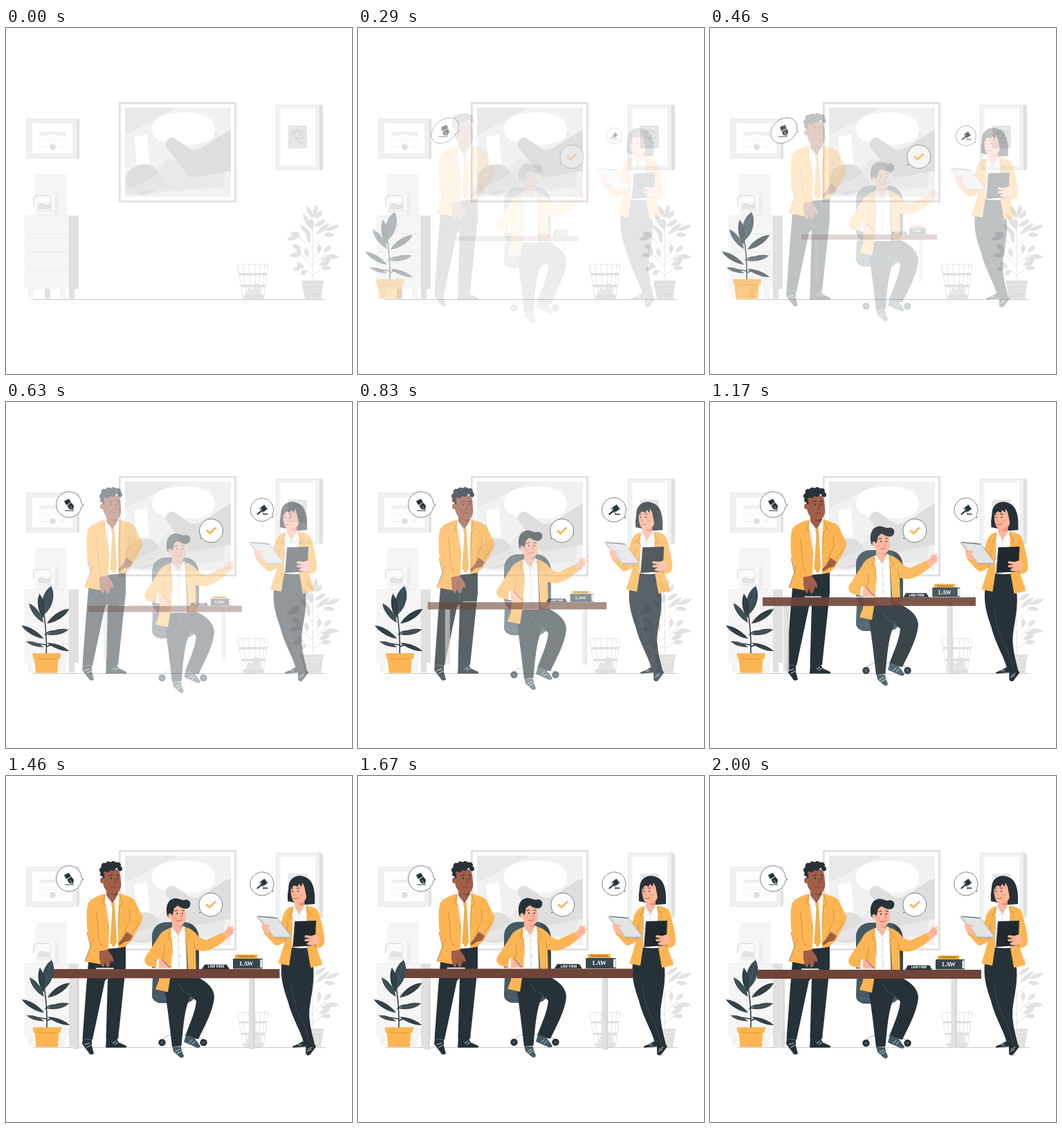
Animation, 500 px wide and 500 px high, one loop 2040 ms. Source, as an HTML page with a canvas:

```html
<!DOCTYPE html>
<html lang="en">
<head>
<meta charset="utf-8">
<title>Law office</title>
<style>
html,body{margin:0;width:100%;height:100%;overflow:hidden;background:#fff}
canvas{display:block;width:100vmin;height:100vmin}
</style>
</head>
<body>
<canvas id="stage"></canvas>
<script>
const SIZE = 500, LOOP = 2040, FPS = 24;
const dpr = Math.max(1, window.devicePixelRatio || 1);
const stage = document.getElementById('stage');
const layer = document.createElement('canvas');
for (const c of [stage, layer]) c.width = c.height = SIZE * dpr;
const out = stage.getContext('2d');
let g = out;

const WHITE = '#fff', INK = '#263238', SLATE = '#455a64', GOLD = '#fcb552', BROWN = '#6f4439';
const DARK_SKIN = '#a15f49', SKIN = '#ffb69b', SEAM = '#a8742e';
const G1 = '#f5f5f5', G2 = '#ebebeb', G3 = '#e0e0e0';

// drawing helpers
function fill(color, d) { g.fillStyle = color; g.fill(new Path2D(d)); }
function line(color, w, d) {
  g.strokeStyle = color; g.lineWidth = w; g.lineCap = g.lineJoin = 'round';
  g.stroke(new Path2D(d));
}
function box(color, x, y, w, h, r = 0) {
  g.fillStyle = color; g.beginPath(); g.roundRect(x, y, w, h, r); g.fill();
}
function oval(color, x, y, rx, ry = rx, rot = 0) {
  g.fillStyle = color; g.beginPath(); g.ellipse(x, y, rx, ry, rot, 0, 7); g.fill();
}
function text(s, x, y, font, color) {
  g.font = font; g.fillStyle = color; g.textAlign = 'center'; g.textBaseline = 'middle';
  g.fillText(s, x, y);
}
function leaf(color, x, y, tx, ty, w) {
  const dx = tx - x, dy = ty - y, l = Math.hypot(dx, dy), nx = -dy / l * w, ny = dx / l * w;
  g.fillStyle = color; g.beginPath(); g.moveTo(x, y);
  g.bezierCurveTo(x + dx * .3 + nx, y + dy * .3 + ny, x + dx * .75 + nx, y + dy * .75 + ny, tx, ty);
  g.bezierCurveTo(x + dx * .75 - nx, y + dy * .75 - ny, x + dx * .3 - nx, y + dy * .3 - ny, x, y);
  g.fill();
}

function room() {
  // certificate
  box('#f0f0f0', 29.5, 131.5, 74, 57); box(G3, 103, 131.5, 3, 57);
  line(G3, .6, 'M29.5 131.5H103V188.5H29.5Z');
  box(WHITE, 38, 138, 58, 43);
  text('CERTIFICATE', 67.5, 153.5, '700 6.3px "Open Sans", sans-serif', '#dcdcdc');
  line(G2, .6, 'M48 160.5H87M48 163.5H87M49 173H59M76 173H87');
  line(G3, .5, 'M50 172q2 -4 3 -1t4 -1M78 172q2 -4 3 -1t4 -1');
  oval(G3, 67.5, 172, 4.5);
  // coffee maker
  box(G1, 42.5, 211, 46, 61, 5); line(G2, .6, 'M75.5 216V271M45 217H86');
  fill('#efefef', 'M70 238H75V271H70Z');
  box('#fafafa', 45, 240, 24, 24, 2);
  line('#dedede', 1.6, 'M40 256V247Q40 242 45 242H63');
  fill('#e3e3e3', 'M46 255Q52 251 56 254T64 252V262H46Z');
  line(G3, 1, 'M44 264H69M65 242V262');
  // cabinet
  box(G1, 26.5, 271, 65, 106); box(G3, 91, 271, 14, 106);
  line('#e8e8e8', .7, 'M29 297.5H88M29 323.5H88M29 350.5H88M26.5 271.5H91');
  for (const y of [286, 311, 337, 362]) oval('#e6e6e6', 57.5, y, 1.4);
  box(G1, 32, 377, 8, 14); box(G3, 56, 377, 8, 14); box(G1, 78, 377, 8, 14); box(G3, 91, 377, 8, 14);
  // large painting
  box('#dfdfdf', 163, 107, 170, 145); box(WHITE, 165.7, 109.7, 164.6, 139.6);
  g.save(); g.beginPath(); g.rect(172, 115, 153, 129); g.clip();
  box('#f1f1f1', 172, 115, 153, 129);
  fill('#e9e9e9', 'M172 115H247Q215 133 172 154Z');
  fill('#e9e9e9', 'M205 220L234 189L318 206L313 230L172 241V225Z');
  fill(WHITE, 'M185 157L204 154L207 197L189 199Z');
  fill(WHITE, 'M211 146C211 126 238 122 262 122C288 122 303 134 302 148C301 163 281 171 256 168C232 166 211 165 211 146Z');
  fill('#dedede', 'M232 172C228 165 235 156 242 159C253 164 265 178 274 176C288 173 306 156 325 147V206L275 216Q265 218 261 211Z');
  oval('#dedede', 198, 219, 25, 22, -.2);
  fill('#e6e6e6', 'M176 232C195 224 205 222 222 210L236 230L180 240Z');
  g.restore();
  // small frame
  box('#f2f2f2', 390, 111, 63, 94); box(G3, 453, 111, 5, 94);
  line(G3, .7, 'M390.5 111.5H453V204.5H390.5Z');
  box(WHITE, 396.5, 117, 50.5, 82); box('#e6e6e6', 408, 141, 27, 33);
  line('#d5d5d5', 1.4, 'M412 153C418 145 428 146 425 154C422 161 414 160 417 152C421 146 434 150 431 157C428 163 419 159 424 155M420 160Q424 168 429 166');
  // waste basket
  line(G3, .8, 'M335 341.5H379L372 391H343ZM342 342L348 390M351 342L354 390M360 342V390M368 342L365 390M374 342L369 390');
  fill('#e6e6e6', 'M346 386L350 375L355 379L360 367L367 372L369 386Z');
  fill(G3, 'M337 354H377L376.5 357.5H337.5ZM340 371H375L374.5 374.5H340.5ZM342 386H373L371 391.5H345Z');
  // pale plant
  line(G3, .9, 'M443 366V279M443 318L420 300M443 316L466 296M443 345L425 326M443 343L463 325M443 356L428 347M443 357L461 346M443 335L455 320');
  for (const [x, y, tx, ty] of [
    [444, 275, 434, 257], [445, 274, 449, 255], [447, 276, 457, 264], [443, 292, 429, 268], [443, 290, 441, 275],
    [446, 287, 462, 277], [440, 300, 425, 284], [448, 298, 468, 282], [426, 300, 406, 306], [425, 297, 411, 298],
    [461, 293, 482, 285], [459, 298, 475, 300], [438, 311, 436, 291], [425, 318, 413, 314], [427, 327, 409, 329],
    [424, 331, 422, 314], [436, 332, 433, 318], [452, 326, 453, 312], [459, 324, 470, 315], [461, 330, 481, 331],
    [455, 334, 470, 335], [427, 345, 415, 350], [430, 347, 420, 338], [434, 350, 426, 357], [455, 347, 470, 347], [452, 343, 468, 338]
  ]) leaf('#e2e2e2', x, y, tx, ty, 4.2);
  fill(G3, 'M427 365H459L455 391.5H432Z');
  line('#ececec', .8, 'M430 371H456M434 376H453M436 381H450');
  line('#a9aeb1', .7, 'M39 392.4H461');
}

function standingMan() {
  fill(INK, 'M120 258L146 266L147 246H173L173 276L162 380L144.5 380L147 292L143 296L125 381L110.5 380L116 305Z');
  line('#53626a', .5, 'M146 268L147 292');
  fill(INK, 'M111 380L124 381L124 390L127 401Q122 405 119 399L110 387Z');
  fill(INK, 'M145 379L159 378L163 385L174 390V392.5H144Z');
  line(WHITE, .8, 'M114 388L121 386M117 392L123 389M154 386L159 383M157 388L162 385');
  fill(WHITE, 'M143 172L164 171L166 248L145 250L141 200Z');
  fill(DARK_SKIN, 'M145 160H162V173L154 184L145 174Z');
  fill('#834837', 'M149 168Q158 171 162 167V173Q154 174 149 168Z');
  fill(DARK_SKIN, 'M140 140C149 132 163 132 165 142L166.5 157C166 167 160 171 153 170C146 169 141 162 140 154Z');
  oval(DARK_SKIN, 139, 151, 3, 4);
  for (const [x, y, r] of [[139, 136, 4], [142, 130, 4.5], [148, 128, 4.5], [155, 127.5, 4.5], [161.5, 129, 4.5], [164.5, 134, 3.5], [154, 132, 5], [146, 134, 5], [139, 142, 3], [141, 146, 1.8]])
    oval(INK, x, y, r);
  line(INK, 1.1, 'M149 144L153 143M159 143L163 144');
  oval(INK, 152, 148, .9, 1.2); oval(INK, 161, 148, .9, 1.2);
  line('#6c3729', .8, 'M157 148L159 154L156 155M152 161Q157 159 160 161');
  fill(WHITE, 'M144 171L153 183L148 187L141 176ZM162 170L155 183L160 186L166 174Z');
  line('#9aa3a8', .4, 'M144 172L153 183L148 187M162 171L155 183L160 186');
  fill('#f5ae49', 'M152 183H157L160 240L156 248L150.5 241L153.5 192Z');
  fill(GOLD, 'M143 170C132 173 122 178 119 183C115 195 117 215 118 228L122 246L114 268L136 272C144 262 148 251 148 246L149 223L144 190Z');
  fill(GOLD, 'M164 169.5C174 173 185 175 187 182L197 203C199 209 192 218 182 237L172 247L162 248C162 230 162 190 164 169.5Z');
  line(SEAM, .55, 'M143 172L140 184L145 188L149 222M164 171L169 184L164 188L162 220M131 197L134 236L138 246M178 194L179 208L170 227M122 246L126 236M180 228Q189 219 193 211');
  line(INK, .45, 'M117 226L122 246L114 268');
  fill(DARK_SKIN, 'M135 253L147 251L154 261L156 269L152 267L149 275L146 277L143 270L141 277L137 273L135 264Z');
  line('#70402f', .5, 'M143 270L145 262M149 272L149 264');
  fill(DARK_SKIN, 'M174 225L183 231L179 238L171 240L164 245L162 242L168 235Z');
  line('#70402f', .5, 'M165 242L174 235');
}

function woman() {
  fill(INK, 'M407 162C407 147 420 141 431 146C443 150 446 166 445 185L432 186L406 181Q405 172 407 162Z');
  fill(INK, 'M402 247H436L443 278C445 305 437 325 437 345C438 365 443 378 445 389L430 390C427 372 412 350 406 325C399 305 395 290 397 270Z');
  line('#53626a', .5, 'M410 300Q416 338 430 360L438 386');
  fill(INK, 'M428 383L432 391L413 392.5V390.5L422 387ZM432 389L445 388L447 391L438 403Q433 405 432 401Z');
  line(WHITE, .7, 'M421 389L426 388M435 395L441 392M434 398L440 395');
  fill(WHITE, 'M411 190L433 189L436 248Q422 250 409 247Z');
  fill(SKIN, 'M417 178H430V190L422 199L415 191Z');
  fill(SKIN, 'M411 155L431 153L433 175C431 184 420 187 414 181C410 174 410 164 411 155Z');
  fill('#e9937a', 'M420 184Q428 184 430 179V186Q424 189 420 184Z');
  fill(INK, 'M409 165C408 149 420 143 431 149L439 160L438 185L431 184L433 175L430 160L427 154L426 160L422 156L420 160L415 158Z');
  line(INK, .9, 'M411 163L414 162M419 162L423 162');
  oval(INK, 413, 166.5, .8, 1.2); oval(INK, 421, 166.5, .8, 1.2);
  line('#e57a62', .8, 'M416 167L414.5 172L417 172.5');
  line('#c94f45', .9, 'M414 176.5Q418 179 422 176');
  oval('#ff9f88', 425, 172, 2.2, 1.6);
  fill(WHITE, 'M416 188L422 199L417 203L411 192ZM430 187L423 199L428 202L433 191Z');
  line('#9aa3a8', .4, 'M416 188L422 199L417 203M430 187L423 199L428 202M422 199L421 247');
  fill(GOLD, 'M414 188C405 190 401 195 399 204L390 228L381 220L371 227L387 244Q391 247 402 239L392 271L408 274L412 247V210Z');
  fill(GOLD, 'M432 187C443 189 449 191 451 198C456 215 460 233 459 240C458 247 451 249 448 248L456 273L439 277L434 248V212Z');
  line(SEAM, .55, 'M414 190L408 202L413 205L412 228M432 189L439 201L434 205L435 230M402 239L406 213M444 212L447 230L446 249');
  // notebook
  fill(SKIN, 'M368 215L374 213L382 217L384 223L378 229L370 224Z');
  fill('#c3c8ca', 'M361 204L385 203L411 232L409 235L385 233Z');
  fill('#e1e3e4', 'M363 202.5L391 205L411 232L387 232Z');
  line('#7d878c', .6, 'M361 204L363 202.5L391 205L411 232M387 234H409');
  line('#65717a', 1.2, 'M364 203L390 205.5');
  fill(SKIN, 'M369 215L377 214L381 218L374 219L382 222L375 223L379 227L372 226Z');
  // tablet
  fill('#1f292e', 'M416 210L447 209L445 245L413 247Z');
  line('#53626a', .6, 'M416.5 210.5L414 246');
  fill(SKIN, 'M451 232L446 229L440 231L431 230L430 233L438 235L430 236L431 239L438 239L433 242L435 244L443 245L451 241Z');
  line('#df876d', .5, 'M433 233L441 235M432 237L441 238');
}

function seatedMan() {
  // chair
  line('#d4d7d9', 3, 'M245 326V374');
  line('#cfd3d5', 1.8, 'M226 383Q230 375 245 374Q276 374 285 383M245 374V388');
  for (const x of [225.5, 285.5]) { oval(INK, x, 386, 5.2); oval(SLATE, x, 386, 2); }
  box(SLATE, 211, 212, 67, 84, 20);
  fill(SLATE, 'M212 291H275V315Q272 328 258 329H222Q210 326 211 316Z');
  line('#65757d', .6, 'M213 318Q228 327 262 322');
  fill('#37474f', 'M263 215Q278 218 279 236V281H270V235Q270 221 263 215Z');
  // legs and shoes
  fill(INK, 'M228 297L246 290L276 291Q301 303 301 321C299 341 287 362 278 381L259 377C264 361 273 345 275 326L267 318C257 338 256 368 253.5 391L240 392L235 350Z');
  line('#53626a', .6, 'M249 300Q255 315 268 317');
  fill(SLATE, 'M240.5 392H253L254 398L257 405Q256 410 251 407L242 399Z');
  fill(SLATE, 'M260 375L272 379L281 391Q280 395 275 393L257 385Z');
  line(WHITE, .8, 'M245 399L251 396M247 402L253 399M265 386L269 382M269 388L273 384');
  // torso
  fill(WHITE, 'M238 222L259 220L262 292H236Z');
  fill(SKIN, 'M240 208H255V222L249 231L240 222Z');
  fill('#ee9a80', 'M244 214Q251 218 255 214V220Q248 220 244 214Z');
  fill(SKIN, 'M237 188L258 187L260 206C259 214 254 218 248 217C241 215 237 208 237 201Z');
  fill(INK, 'M233 203C230 191 233 180 242 178C249 176 253 181 258 180C264 178 269 184 265 190C261 195 254 192 248 188L243 192L241 201L236 206Z');
  oval(SKIN, 237, 203, 2.6, 3.6);
  line(INK, 1, 'M244 196L248 195M254 195L257 195.5');
  oval(INK, 247, 199.5, .9, 1.2); oval(INK, 255, 199.5, .9, 1.2);
  line('#e57a62', .8, 'M251.5 199L254 204.5L251 205');
  line('#c94f45', .9, 'M246 210Q250 212 254 209');
  oval('#ff9f88', 244, 206, 2.2, 1.6);
  fill(WHITE, 'M240 219L248 230L243 234L236 222ZM256 217L250 230L255 233L260 220Z');
  line('#9aa3a8', .4, 'M240 219L248 230L243 234M256 217L250 230L255 233M249 231L250 285');
  for (const y of [239, 250, 261, 272]) oval('#8d979c', 250.5, y, .6);
  fill(GOLD, 'M238 220C229 223 223 227 220 234L201 263Q198 270 205 275L222 279L221 296L216 309L234 313L239 282L240 245Z');
  fill(GOLD, 'M258 219C267 221 274 226 279 234L289 238L313 227L319 236C309 245 295 254 284 254L274 252L275 291H264L261 250Z');
  line(SEAM, .55, 'M238 222L234 234L239 238L241 260M259 221L265 233L260 237L261 258M221 278L229 257L229 246M274 252L271 241M214 267L223 271');
  // hands
  fill(SKIN, 'M313 228L319 222L321 217L324 219L330 217L326 222L332 221L327 226L330 227L319 236Z');
  line('#df876d', .5, 'M321 226L326 222M323 228L328 225');
  fill(WHITE, 'M218 266L222 264L222 278L217 278Z');
  fill(SKIN, 'M221 265L229 267L237 275L235 279H221Z');
  line('#df876d', .5, 'M229 272L235 277');
  line(INK, .8, 'M226 266L238 279');
}

function desk() {
  for (const x of [99.5, 348.5]) { box('#e0e0e0', x, 292, 8.5, 101); box('#d6d6d6', x + 6, 292, 2.5, 101); }
  box(BROWN, 68, 280, 324, 13);
  box('#eceff0', 203, 278.3, 36, 1.8); box('#eceff0', 132, 278.3, 25, 1.8);
  // name plate and books
  fill(INK, 'M286 273.5H317L321 280H282Z');
  text('LAW FIRM', 302, 277.2, '700 4.7px "Open Sans", sans-serif', WHITE);
  box('#37474f', 326, 265, 42, 14.5, 1); box('#eef0f1', 364.5, 266.5, 3.2, 11.5);
  text('LAW', 345, 272.8, '700 8.6px "Liberation Serif", serif', WHITE);
  box('#f2a93f', 329, 259.5, 32, 5.5, .8); box('#fff3df', 360, 260.5, 5, 3.8);
  text('Constitution', 345, 262.4, '600 4px "Open Sans", sans-serif', '#5d4326');
}

function plant() {
  line(INK, 1.5, 'M59 366Q60 335 55 302M59 354Q66 349 74 352M58 351Q48 349 42 349M57 336Q63 330 73 331');
  const leaves = [
    [55, 308, 66, 266, 10], [54, 313, 49, 277, 6], [55, 319, 34, 291, 5.5], [55, 342, 23, 323, 5],
    [55, 354, 30, 346, 3.6], [60, 320, 92, 299, 6], [59, 336, 91, 329, 5], [60, 348, 92, 360, 4]
  ];
  leaves.forEach(([x, y, tx, ty, w], i) => {
    leaf(i % 2 ? '#2d3b42' : '#3b4c55', x, y, tx, ty, w);
    line('#63727a', .4, `M${x} ${y}L${tx} ${ty}`);
  });
  fill(GOLD, 'M39 363H80L79 371H76.5L75 391.5H43.5L41.5 371H40Z');
  line('#c98629', .7, 'M47 370.8Q60 372 74 370.8');
}

function bubble(x, y, r, tail) {
  g.fillStyle = WHITE; g.strokeStyle = INK; g.lineWidth = .6; g.lineJoin = 'round';
  g.beginPath(); g.arc(x, y, r, tail + .09, tail - .09 + Math.PI * 2);
  g.lineTo(x + Math.cos(tail) * (r + 2.6), y + Math.sin(tail) * (r + 2.6));
  g.closePath(); g.fill(); g.stroke();
}
function penBubble() {
  bubble(91, 148.2, 18.5, .05);
  fill(INK, 'M84 143L91 140L94 145L87 149ZM88.5 149.5L94.5 145.5L98 150L97 156L91 154.5Z');
  line(WHITE, .7, 'M96 155L92.5 150.5');
  line(INK, 1.2, 'M85.5 157H97.5');
}
function checkBubble() {
  bubble(295.8, 186, 17, 2.52);
  line(GOLD, 2.8, 'M290 186L294 190L302 182');
}
function gavelBubble() {
  bubble(370, 155.8, 17, .6);
  line(INK, 2.2, 'M363.5 162L371 156');
  fill(INK, 'M367.5 152.5L373 149L377.5 155L372 159Z');
  line(INK, 1, 'M366.5 153.5L371.5 160M373 148.5L378 155');
  line(INK, 1.5, 'M371.5 162H378');
}

// eased progress with a slight overshoot
function ease(x) {
  if (x <= 0) return 0;
  if (x >= 1) return 1;
  const curve = (a, b, s) => 3 * a * s * (1 - s) ** 2 + 3 * b * s * s * (1 - s) + s ** 3;
  let lo = 0, hi = 1;
  for (let i = 0; i < 24; i++) {
    const m = (lo + hi) / 2;
    if (curve(.36, .5, m) < x) lo = m; else hi = m;
  }
  return curve(-.01, 1.38, lo);
}

function group(draw, alpha, { dx = 0, dy = 0, scale = 1, skew = 0, cx = 0, cy = 0 } = {}) {
  if (alpha <= 0) return;
  g = layer.getContext('2d');
  g.setTransform(1, 0, 0, 1, 0, 0);
  g.clearRect(0, 0, layer.width, layer.height);
  g.scale(dpr, dpr);
  g.translate(cx + dx, cy + dy);
  g.transform(scale, 0, Math.tan(skew * Math.PI / 180) * scale, scale, 0, 0);
  g.translate(-cx, -cy);
  draw();
  out.setTransform(1, 0, 0, 1, 0, 0);
  out.globalAlpha = Math.min(1, alpha);
  out.drawImage(layer, 0, 0);
  out.globalAlpha = 1;
}

function render(ms) {
  const slow = ease(ms / 2000), medium = ease(ms / 1680), quick = ease(ms / 1000);
  const dash = Math.min(1, ms / 620);
  g = out;
  out.setTransform(dpr, 0, 0, dpr, 0, 0);
  out.fillStyle = WHITE; out.fillRect(0, 0, SIZE, SIZE);
  room();
  group(standingMan, medium);
  group(woman, medium, { dx: -20 * (1 - medium) });
  group(seatedMan, slow, { dy: 20 * (1 - slow) });
  group(desk, slow, { scale: .5 + slow / 2, cx: 230, cy: 326 });
  group(plant, quick, { dx: -20 * (1 - quick) });
  group(penBubble, ms > 0 ? dash : 0, { dx: 70 * (1 - dash), skew: -Math.min(20, 60 * (1 - dash)), cx: 91, cy: 148 });
  group(checkBubble, quick, { dx: 20 * (1 - quick) });
  group(gavelBubble, quick, { scale: .5 + quick / 2, cx: 370, cy: 156 });
}

let shown = -1;
const start = performance.now();
function tick() {
  const t = (performance.now() - start) % LOOP;
  const step = Math.min(48, Math.floor((t + 4) * FPS / 1000));
  if (step !== shown) {
    shown = step;
    render(step < 2 ? 0 : (step + .5) * 1000 / FPS);
  }
  requestAnimationFrame(tick);
}
tick();
</script>
</body>
</html>
```
